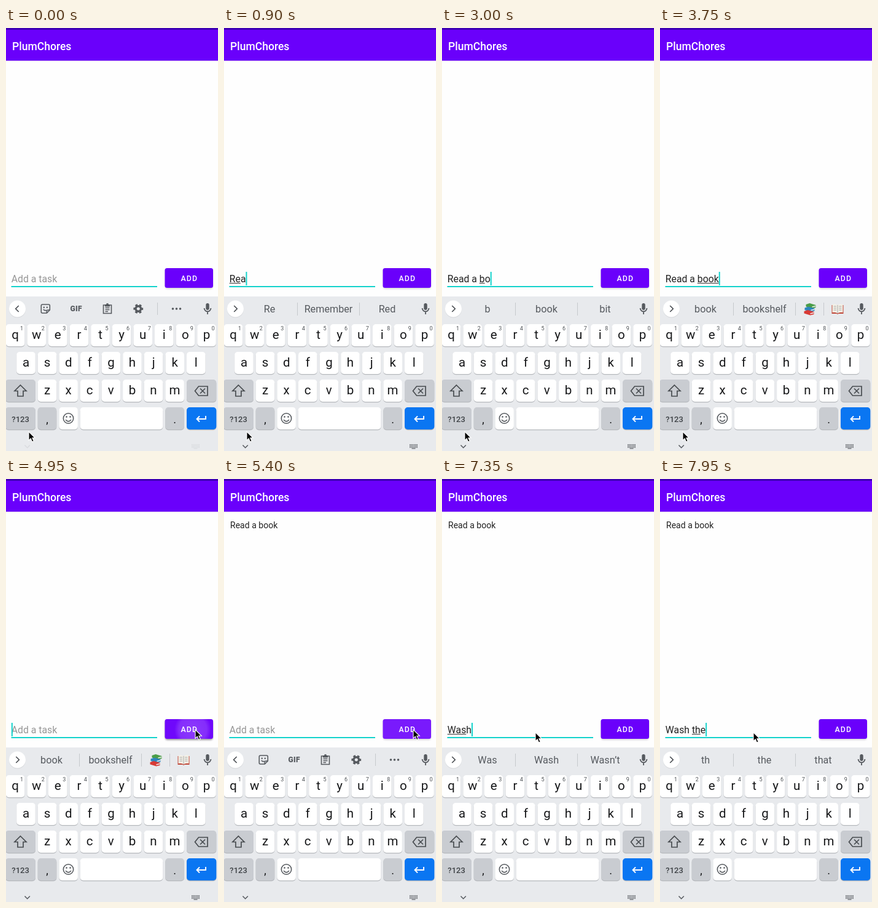
An HTML page for the animation above (8 s loop, 345 px wide and 687 px high).

```html
<!DOCTYPE html>
<html lang="en">
<head>
<meta charset="utf-8">
<title>To-do list</title>
<style>
  html, body { margin: 0; width: 100%; height: 100%; overflow: hidden; background: #fefefe; }
  svg { display: block; width: 100%; height: 100%; }
  text { font-family: Roboto, sans-serif; white-space: pre; }
</style>
</head>
<body>
<svg id="stage" viewBox="0 0 345 687">
  <defs>
    <radialGradient id="rippleFill">
      <stop offset="0" stop-color="#fff" stop-opacity=".2"/>
      <stop offset=".75" stop-color="#fff" stop-opacity=".15"/>
      <stop offset="1" stop-color="#fff" stop-opacity="0"/>
    </radialGradient>
    <clipPath id="buttonClip"><rect x="258.5" y="390" width="78.5" height="32" rx="3.5"/></clipPath>
    <filter id="blur" x="-20%" y="-40%" width="140%" height="180%"><feGaussianBlur stdDeviation="1.7"/></filter>
  </defs>
</svg>
<script>
const LOOP = 8000, STEP = 150;
const PURPLE = '#6a00fb', TEAL = '#14d3cc', ICON = '#565a5f';
const stage = document.getElementById('stage');

function add(parent, tag, attrs, content) {
  const node = document.createElementNS('http://www.w3.org/2000/svg', tag);
  for (const name in attrs) node.setAttribute(name, attrs[name]);
  if (content !== undefined) node.textContent = content;
  parent.append(node);
  return node;
}
const group = (parent = stage, attrs = {}) => add(parent, 'g', attrs);
const rect = (parent, x, y, width, height, fill, rx = 0) =>
  add(parent, 'rect', { x, y, width, height, fill, rx });
const label = (parent, x, y, size, fill, content, more = {}) =>
  add(parent, 'text', { x, y, 'font-size': size, fill, ...more }, content);
const centred = { 'text-anchor': 'middle' };
const line = (parent, d, stroke = ICON, width = 1.6, more = {}) =>
  add(parent, 'path', { d, fill: 'none', stroke, 'stroke-width': width, ...more });
const shape = (parent, d, fill = ICON) => add(parent, 'path', { d, fill });
const dot = (parent, cx, cy, r, fill = ICON) => add(parent, 'circle', { cx, cy, r, fill });
const at = (parent, x, y) => group(parent, { transform: `translate(${x} ${y})` });
const show = (node, visible) => node.setAttribute('visibility', visible ? 'inherit' : 'hidden');

const ruler = document.createElement('canvas').getContext('2d');
ruler.font = '15.8px Roboto, sans-serif';
const textWidth = text => ruler.measureText(text).width;

// App bar, list and input row
rect(stage, 0, 0, 345, 687, '#fefefe');
rect(stage, 0, 53, 345, 1, '#e4dcf0');
rect(stage, 0, 0, 345, 53, PURPLE);
rect(stage, 0, 0, 345, 3, '#3d00b4');
label(stage, 10, 35.5, 17.56, '#fff', 'PlumChores', { 'font-weight': 500 });
const listItem = label(stage, 10, 80, 14.05, '#222', 'Read a book');

rect(stage, 8.5, 419, 237.5, 2, TEAL);
const fieldText = label(stage, 8.8, 413, 15.8, '#222', '');
const composing = rect(stage, 9, 414, 0, 1, '#333');
const caret = rect(stage, 9, 396, 2, 22, TEAL);

const shadow = rect(stage, 259, 392, 77.5, 32, '#000', 4);
shadow.setAttribute('filter', 'url(#blur)');
rect(stage, 258.5, 390, 78.5, 32, PURPLE, 3.5);
const highlight = rect(stage, 258.5, 390, 78.5, 32, '#fff', 3.5);
const ripple = add(stage, 'circle',
  { cx: 304, cy: 407, r: 30, fill: 'url(#rippleFill)', 'clip-path': 'url(#buttonClip)' });
label(stage, 298.3, 410.8, 12.3, '#fff', 'ADD',
  { ...centred, 'font-weight': 500, 'letter-spacing': 1.1 });

// Strip above the keys
rect(stage, 0, 436, 345, 251, '#e8eaed');
dot(stage, 18.5, 456.8, 13.6, '#d5d7da');
dot(stage, 18.5, 456, 13.5, '#fff');
const stripArrow = line(stage, '', '#4b4f54', 1.7);
const mic = at(stage, 328, 456);
rect(mic, -2.7, -9, 5.4, 11, ICON, 2.7);
line(mic, 'M-5.4 -1a5.4 5.4 0 0 0 10.8 0M0 4.5V9', ICON, 1.8);

const tools = group();
const sticker = at(tools, 64.3, 456);
line(sticker, 'M-5 -7H5Q7 -7 7 -5V2L2 7H-5Q-7 7 -7 5V-5Q-7 -7 -5 -7ZM2 7V4Q2 2 4 2H7M-3.5 1Q-1 4 1.5 2');
dot(sticker, -2.5, -2.2, 1.2);
dot(sticker, 2.5, -2.2, 1.2);
label(tools, 114.3, 460, 12, ICON, 'GIF', { ...centred, 'font-weight': 900, 'letter-spacing': .4 });
const clipboard = at(tools, 165, 456);
line(clipboard, 'M-6.5 -6H6.5V7.5H-6.5ZM-3.5 -1.5H3.5M-3.5 1.5H3.5M-3.5 4.5H1');
shape(clipboard, 'M-4 -7H-2A2 2 0 0 1 2 -7H4V-3.5H-4Z');
const gear = at(tools, 215.3, 456);
add(gear, 'circle', { r: 4.3, fill: 'none', stroke: ICON, 'stroke-width': 3.4 });
add(gear, 'circle', { r: 6.6, fill: 'none', stroke: ICON, 'stroke-width': 2.6,
  'stroke-dasharray': '3.7 3.21', 'stroke-dashoffset': 1.85 });
rect(tools, 246, 446, 1, 20, '#c6c9cd');
[-6, 0, 6].forEach(dx => dot(tools, 277.5 + dx, 456, 1.8));

const suggestions = group();
const words = [74, 170, 265.5].map(x => label(suggestions, x, 462, 16.2, ICON, '', centred));
[119, 220].forEach(x => rect(suggestions, x, 446, 1, 21, '#c6c9cd'));
const pictures = group(suggestions);
rect(pictures, 266, 446, 1, 21, '#c6c9cd');
const stack = at(pictures, 243.5, 456);
[['#4a9d48', -8], ['#2d86bd', -2.5], ['#d83a35', 3]].forEach(([color, y], i) => {
  const x = [-6, -8, -9][i];
  shape(stack, `M${x} ${y + 1}l6 -2l10 3v4l-6 1.5l-10 -3z`, color);
  line(stack, `M${x + 10} ${y + 5}l6 -1.5`, '#eee', 1.5);
});
const openBook = at(pictures, 289, 456);
shape(openBook, 'M-9.5 -6H9.5V8H1.5L0 9L-1.5 8H-9.5Z', '#c04a3c');
shape(openBook, 'M-8.5 -7Q-3 -8.5 0 -5.5Q3 -8.5 8.5 -7V6Q3 5 0 7.5Q-3 5 -8.5 6Z', '#f4f1e6');
line(openBook, 'M0 -5.5V7M-6.5 -4H-2M-6.5 -1H-2M-6.5 2H-2M2 -4H6.5M2 -1H6.5M2 2H6.5', '#a4a7aa', 1);

// Keys
const GREY = '#c9ccd1', INK = '#17181a', PITCH = 34.6;
function key(x, y, width = 30.6, fill = '#fff', height = 36) {
  rect(stage, x, y + 1.2, width, height, '#b6b9bd', 5);
  rect(stage, x, y, width, height, fill, 5);
}
[['qwertyuiop', -.2, 481], ['asdfghjkl', 17.2, 526], ['zxcvbnm', 51.7, 571]].forEach(([letters, left, y], row) =>
  [...letters].forEach((letter, i) => {
    const x = left + i * PITCH;
    key(x, y);
    label(stage, x + 15.3, y + 24, 20.5, INK, letter, centred);
    if (!row) label(stage, x + 25.8, y + 10, 9, '#4c5054', (i + 1) % 10, centred);
  }));
key(-1, 571, 49, GREY);
line(stage, 'M23.5 580L33 589.5H28V598H19V589.5H14Z', '#484c50', 1.7);
key(294, 571, 48.3, GREY);
line(stage, 'M313.5 582H328V597H313.5L307.5 589.5ZM316 585.5L324 593.5M324 585.5L316 593.5', '#484c50', 1.7);
key(-1, 616, 49, GREY);
label(stage, 23.6, 639.5, 13, '#3f4347', '?123', { ...centred, 'font-weight': 500 });
key(51.7, 616, 30.6, GREY);
label(stage, 67, 642, 18, INK, ',', centred);
key(86.3, 616);
add(stage, 'circle', { cx: 101.5, cy: 634, r: 8.2, fill: 'none', stroke: ICON, 'stroke-width': 1.6 });
dot(stage, 98.5, 631.5, 1.3);
dot(stage, 104.5, 631.5, 1.3);
line(stage, 'M97 636.2Q101.5 641.5 106 636.2');
key(120.7, 616, 134.6);
key(259.3, 616, 30.6, GREY);
label(stage, 274.6, 642, 18, INK, '.', centred);
key(294, 616, 48.3, '#0a76f2');
line(stage, 'M325 630V635H311M315 630.5L310.5 635L315 639.5', '#fff', 1.9);

const navigation = group();
line(navigation, 'M30.5 677.5L34.7 681.8L38.9 677.5', ICON, 1.5);
for (let row = 0; row < 3; row++)
  for (let col = 0; col < 6; col++) rect(navigation, 302 + col * 2.3, 676 + row * 2.2, 1.5, 1.4, ICON);
rect(navigation, 305.5, 682.4, 6, 1.1, ICON);

const pointer = group();
add(pointer, 'path', { d: 'M0 0V14.2L3.3 11.2L5.6 16.6L8.2 15.5L5.9 10.3H10.3Z',
  fill: '#000', stroke: '#fff', 'stroke-width': 1.1 });

// time, field text, underlined range, suggestions (none = tool row)
const edits = [
  [0, '', 0, 0, ''],
  [450, 'R', 0, 0, ''],
  [600, 'R', 0, 1, 'R|Remember|Run'],
  [750, 'Re', 0, 1, 'R|Remember|Run'],
  [900, 'Rea', 0, 2, 'Re|Remember|Red'],
  [1050, 'Read', 0, 3, 'Rea|Read|Really'],
  [1350, 'Read', 0, 4, 'Read|Ready|Reading'],
  [1650, 'Read ', 0, 4, 'Read|Ready|Reading'],
  [1950, 'Read a', 0, 0, 'this|the|it'],
  [2100, 'Read a', 5, 6, 'a|and|all'],
  [2250, 'Read a ', 0, 0, 'few|book|little'],
  [2700, 'Read a b', 0, 0, 'few|book|little'],
  [2850, 'Read a b', 7, 8, 'b|book|bit'],
  [3000, 'Read a bo', 7, 8, 'b|book|bit'],
  [3150, 'Read a bo', 7, 9, 'bo|book|both'],
  [3300, 'Read a boo', 7, 9, 'bo|book|both'],
  [3450, 'Read a book', 7, 10, 'boo|book|books'],
  [3750, 'Read a book', 7, 11, 'book|bookshelf'],
  [4950, '', 0, 0, 'book|bookshelf'],
  [5100, '', 0, 0, ''],
  [6450, 'W', 0, 0, ''],
  [6600, 'W', 0, 1, 'W|What|We'],
  [6900, 'Wa', 0, 1, 'W|What|We'],
  [7050, 'Wa', 0, 2, 'Wa|Was|Want'],
  [7200, 'Was', 0, 2, 'Wa|Was|Want'],
  [7350, 'Wash', 0, 3, 'Was|Wash|Wasn’t'],
  [7500, 'Wash ', 0, 4, 'Wash|Washing|Washed'],
  [7650, 'Wash t', 0, 0, 'the|my|your'],
  [7800, 'Wash th', 5, 6, 't|the|to'],
  [7950, 'Wash the', 5, 7, 'th|the|that']
];

const ease = (t, from, to) => {
  const p = Math.min(1, Math.max(0, (t - from) / (to - from)));
  return p * p * (3 - 2 * p);
};
const mix = (a, b, p) => a + (b - a) * p;

function drawField(t) {
  const index = edits.findLastIndex(edit => edit[0] <= t);
  const [, text, from, to, strip] = edits[index];
  let first = index;
  while (first && edits[first - 1][1] === text) first--;
  const blink = Math.floor((t - edits[first][0] + 75) / 525) % 2;

  fieldText.textContent = text || 'Add a task';
  fieldText.setAttribute('fill', text ? '#222' : '#969696');
  caret.setAttribute('x', 8.8 + textWidth(text));
  show(caret, t >= 450 && !blink);
  composing.setAttribute('x', 8.8 + textWidth(text.slice(0, from)));
  composing.setAttribute('width', textWidth(text.slice(from, to)));

  show(tools, !strip);
  show(suggestions, strip);
  stripArrow.setAttribute('d', strip ? 'M16.3 451L21.3 456L16.3 461' : 'M20.7 451L15.7 456L20.7 461');
  const parts = strip.split('|');
  words.forEach((word, i) => word.textContent = parts[i] || '');
  show(pictures, parts.length === 2);
}

function draw(now) {
  const t = Math.floor(now % LOOP / STEP) * STEP;
  drawField(t);

  const reach = ease(t, 4050, 4800), leave = ease(t, 5400, 5700);
  const x = mix(mix(37, 308, reach), 152, leave);
  const y = mix(mix(655.5, 407, reach), 411.5, leave);
  pointer.setAttribute('transform', `translate(${x} ${y})`);

  const hovered = x > 258 && y < 422;
  const pressed = t === 4950;
  highlight.setAttribute('opacity', !hovered ? 0 : pressed ? .03 : t === 5100 ? .16 : .1);
  shadow.setAttribute('opacity', pressed || t === 5100 ? .4 : .15);
  show(ripple, pressed);
  show(listItem, t >= 5100);
  navigation.setAttribute('opacity', t < 150 ? .1 : t < 450 ? .7 : 1);
}

function tick() {
  draw(performance.now());
  requestAnimationFrame(tick);
}
tick();
</script>
</body>
</html>
```
